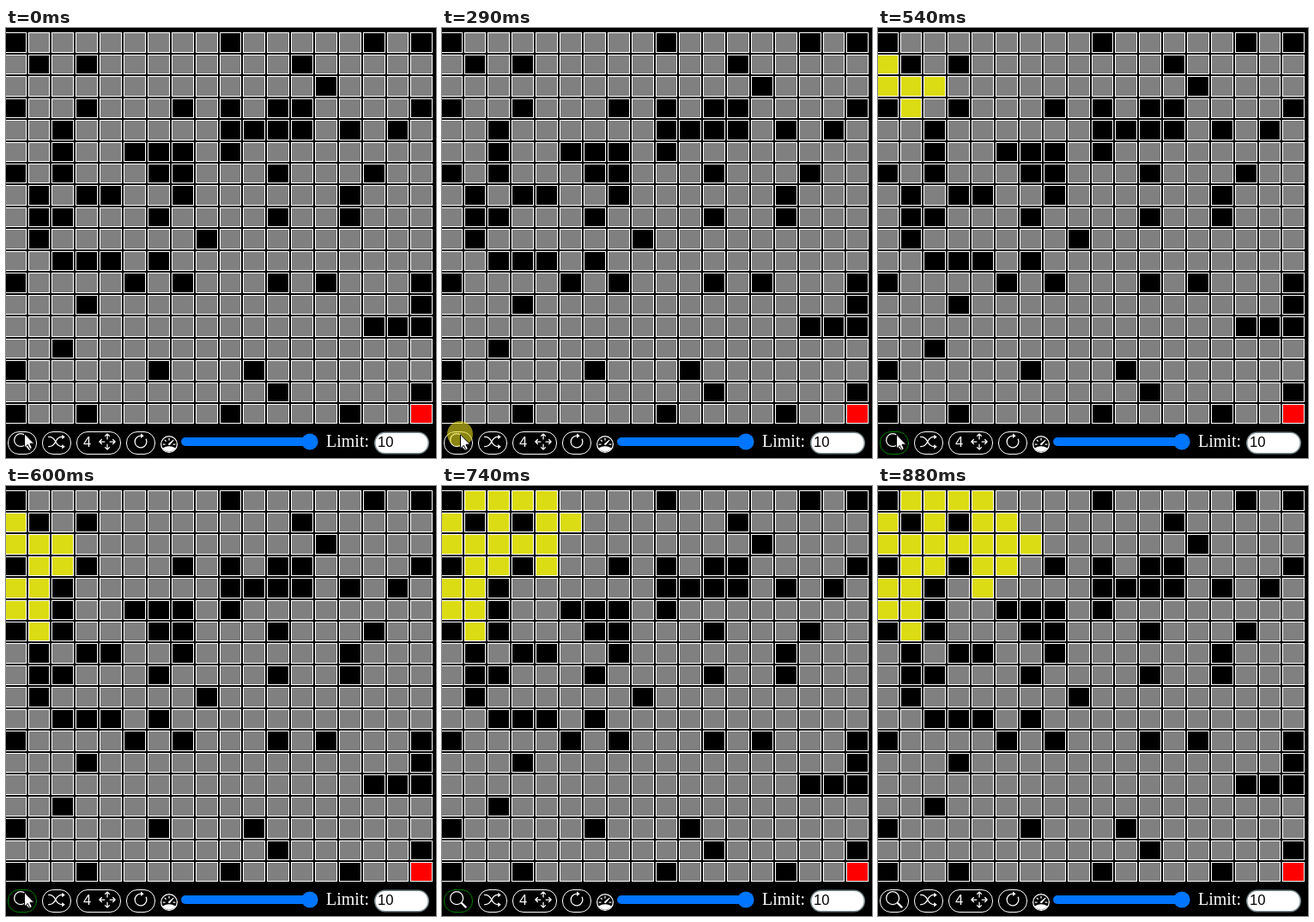
An HTML page for the animation above (1.14 s loop, 501x501 px).

```html
<!DOCTYPE html>
<html lang="en">
<head>
<meta charset="utf-8">
<title>Grid search</title>
<style>
  html, body { margin: 0; width: 100%; height: 100%; overflow: hidden; background: #000; }
  svg { display: block; width: 501px; height: 501px; }
  .cell { shape-rendering: crispEdges; }
  .step, #halo, #cursor, #search { animation: 1140ms step-end infinite; }
  .step { visibility: hidden; }
  .s1 { animation-name: s1; }
  .s2 { animation-name: s2; }
  .s3 { animation-name: s3; }
  .s4 { animation-name: s4; }
  .s5 { animation-name: s5; }
  .s6 { animation-name: s6; }
  #halo { animation-name: halo; }
  #cursor { animation-name: cursor; }
  #search { animation-name: search; }
  @keyframes s1 { 0% { visibility: hidden } 47.36%, 100% { visibility: visible } }
  @keyframes s2 { 0% { visibility: hidden } 52.63%, 100% { visibility: visible } }
  @keyframes s3 { 0% { visibility: hidden } 58.77%, 100% { visibility: visible } }
  @keyframes s4 { 0% { visibility: hidden } 64.91%, 100% { visibility: visible } }
  @keyframes s5 { 0% { visibility: hidden } 71.05%, 100% { visibility: visible } }
  @keyframes s6 { 0% { visibility: hidden } 77.19%, 100% { visibility: visible } }
  @keyframes halo {
    0% { visibility: hidden }
    25.43% { visibility: visible }
    41.22%, 100% { visibility: hidden }
  }
  @keyframes cursor {
    0% { transform: translate(21px, 472px); visibility: visible }
    6.14% { transform: translate(21px, 473px); visibility: visible }
    58.77%, 100% { transform: translate(21px, 473px); visibility: hidden }
  }
  @keyframes search {
    0% { stroke: #fff }
    47.36% { stroke: #008000 }
    77.19%, 100% { stroke: #fff }
  }
  .btn { fill: #000; stroke: #fff; }
  .icon { fill: none; stroke: #fff; stroke-width: 1; stroke-linecap: round; stroke-linejoin: round; }
  .solid { fill: #fff; stroke: none; }
  .sans { font: 16.67px 'Liberation Sans', Arial, sans-serif; }
</style>
</head>
<body>
<svg viewBox="0 0 501 501" xmlns="http://www.w3.org/2000/svg">
  <g id="grid"></g>

  <rect id="search" class="btn" x="2.5" y="470.5" width="33" height="26" rx="12.5"/>
  <rect class="btn" x="42.5" y="470.5" width="33" height="26" rx="12.5"/>
  <rect class="btn" x="82.5" y="470.5" width="51" height="26" rx="12.5"/>
  <rect class="btn" x="140.5" y="470.5" width="33" height="26" rx="12.5"/>

  <!-- icons sit in 16-unit boxes, 20px on screen -->
  <!-- magnifier -->
  <g class="icon" transform="translate(9 472) scale(1.25)">
    <circle cx="6.5" cy="6.5" r="6"/>
    <path d="M11.2 11.2L14.9 14.9" stroke-width="2" style="stroke-width:1.8"/>
  </g>
  <!-- shuffle -->
  <g class="icon" transform="translate(49 472) scale(1.25)">
    <path d="M.5 3.5H1C4 3.5 6 6 7 8S10 12.5 13 12.5M.5 12.5H1C4 12.5 6 10 7 8S10 3.5 13 3.5"/>
    <path class="solid" d="M13 1.3L15.8 3.5L13 5.7ZM13 10.3L15.8 12.5L13 14.7Z"/>
  </g>
  <!-- four directions -->
  <text class="sans" x="90" y="488" fill="#fff">4</text>
  <g class="icon" transform="translate(108 472) scale(1.25)">
    <path id="arm" d="M8 .8V5.5M6 2.7L8 .7L10 2.7"/>
    <use href="#arm" transform="rotate(90 8 8)"/>
    <use href="#arm" transform="rotate(180 8 8)"/>
    <use href="#arm" transform="rotate(270 8 8)"/>
  </g>
  <!-- redo -->
  <g class="icon" transform="translate(147 472) scale(1.25)">
    <path d="M8 2.5A5.5 5.5 0 1 0 13 5.7"/>
    <path class="solid" d="M8 .2L10.9 2.5L8 4.8Z"/>
  </g>
  <!-- gauge -->
  <g class="icon" transform="translate(180 475) scale(1.25)">
    <circle cx="8" cy="8" r="7.5"/>
    <path class="solid" d="M2 11.6A12 12 0 0 1 14 11.6A7 7 0 0 1 2 11.6Z"/>
    <path d="M8 2.5V4M4.1 4.1L5 5M2.5 8H4.1M12 8H13.5"/>
    <path class="solid" d="M12.3 3.8Q12 3.5 11.7 3.7L7.5 7.3A.91 .91 0 1 0 8.85 8.6L12.3 4.3Q12.5 4 12.3 3.8Z"/>
  </g>

  <rect x="204" y="477" width="156" height="10" rx="5" fill="#0075ff"/>
  <circle cx="354" cy="482" r="9.6" fill="#0075ff"/>

  <text x="373" y="488" fill="#fff" font-size="20" font-family="'Liberation Serif', 'Times New Roman', serif">Limit:</text>
  <rect x="429.75" y="471.25" width="62.5" height="24.5" rx="12" fill="#fff" stroke="#77868a" stroke-width="1.5"/>
  <text class="sans" x="433" y="488">10</text>

  <circle id="halo" cx="21" cy="473" r="15" fill="#e6dc1e" fill-opacity=".6"/>
  <path id="cursor" d="M.5 .8V17L4.3 13.4L6.9 18.6L9.4 17.5L7 12.2H11.8Z" fill="#fff" stroke="#000"/>
</svg>
<script>
  // # wall, T goal, digit = search step that reaches the cell
  const map = [
    "#4333....#.....#.#",
    "1#3#44......#.....",
    "1114456......#....",
    "#12#45.#.#.##....#",
    "22#.6....####.#.#.",
    "22#..###.#........",
    "#2#...##...#...#..",
    ".#.##..#......#...",
    ".##...#....#..#...",
    ".#......#.........",
    "..###.#...........",
    "#....#.#...#.#...#",
    "...#.............#",
    "...............###",
    "..#...............",
    "#.....#...#.......",
    "...........#.....#",
    "#..#.....#....#..T"
  ];
  const fills = { "#": "#000", T: "#f00" };
  const gap = 2;
  const grid = document.getElementById("grid");

  const colX = col => Math.round(-2.28 + 27.867 * col);
  const rowY = row => Math.round(5.21 + 25.46 * row);

  function addRect(x, y, w, h, fill, extra = "") {
    const r = document.createElementNS("http://www.w3.org/2000/svg", "rect");
    const attrs = { x, y, width: w, height: h, fill, class: "cell " + extra };
    for (const k in attrs) r.setAttribute(k, attrs[k]);
    grid.appendChild(r);
  }

  map.forEach((line, row) => [...line].forEach((ch, col) => {
    const x = colX(col), y = rowY(row);
    const w = colX(col + 1) - gap - x, h = rowY(row + 1) - gap - y;
    addRect(x, y, w, h, "#fff");
    addRect(x + 1, y + 1, w - 2, h - 2, fills[ch] || "#808080");
    if (ch >= "1" && ch <= "6") addRect(x + 1, y + 1, w - 2, h - 2, "#dcdc14", "step s" + ch);
  }));
</script>
</body>
</html>
```
